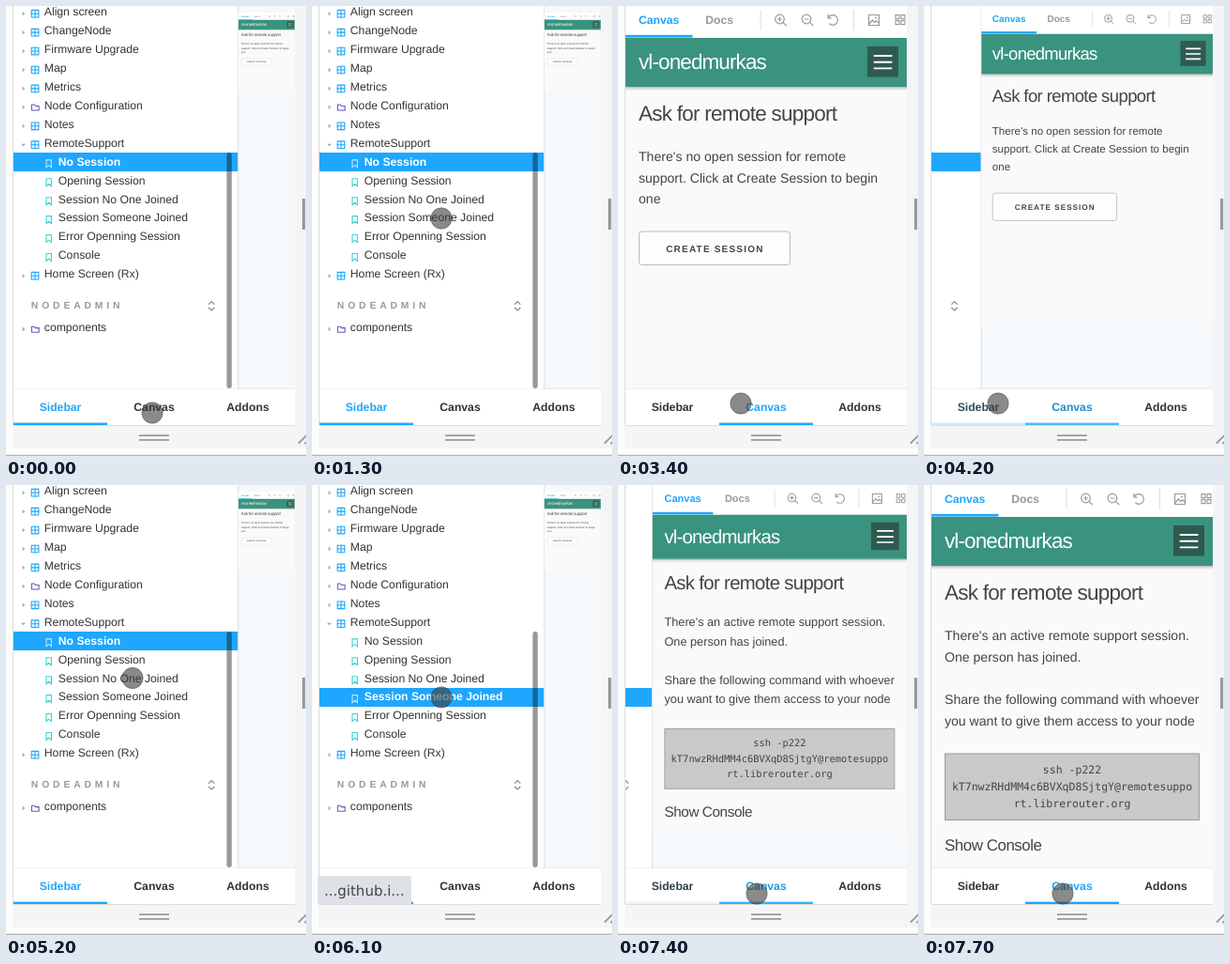
Recreate the animation shown at these times as an HTML page. Size 320 px wide and 480 px high, loop 8000 ms.

```html
<!DOCTYPE html>
<html lang="en">
<head>
<meta charset="utf-8">
<title>Remote support stories</title>
<style>
  html, body { margin: 0; width: 100%; height: 100%; overflow: hidden; background: #fff; }
  svg { display: block; width: 100vw; height: 100vh; }
  text { font-family: "Liberation Sans", Arial, sans-serif; text-rendering: geometricPrecision; white-space: pre; }
  .b { font-weight: 700; }
  .mono { font-family: "DejaVu Sans Mono", monospace; }
  .tip { font-family: "DejaVu Sans", sans-serif; }
</style>
</head>
<body>
<svg id="stage" viewBox="0 0 320 480" xmlns="http://www.w3.org/2000/svg"></svg>
<script>
const LOOP = 8000, STEP = 100;
const BLUE = '#1ea7fd', DARK = '#333', GREY = '#999';

const rect = (x, y, w, h, fill, more = '') =>
  `<rect x="${x}" y="${y}" width="${w}" height="${h}" fill="${fill}" ${more}/>`;
const line = (d, stroke, width = 1, more = '') =>
  `<path d="${d}" fill="none" stroke="${stroke}" stroke-width="${width}" ${more}/>`;
const label = (x, y, str, size, fill, more = '') =>
  `<text x="${x}" y="${y}" font-size="${size}" fill="${fill}" ${more}>${str}</text>`;
const bold = 'class="b"';

// Sidebar tree
const icons = {
  part: y => line(`M27.2 ${y - 3.8}h7.6v7.6h-7.6zM31 ${y - 4.5}v9M26.4 ${y}h9.2`, BLUE, 1.1),
  folder: y => line(`M27.4 ${y + 3.2}v-6h3l1 1.4h3.7v4.6z`, '#6f54b8', 1.1),
  story: y => line(`M43 ${y - 3.8}h5.4v8l-2.7-2.4l-2.7 2.4z`, '#37d5d3', 1.1)
};
const tree = [
  ['part', 'Align screen'], ['part', 'ChangeNode'], ['part', 'Firmware Upgrade'], ['part', 'Map'],
  ['part', 'Metrics'], ['folder', 'Node Configuration'], ['part', 'Notes'], ['part', 'RemoteSupport'],
  ['story', 'No Session'], ['story', 'Opening Session'], ['story', 'Session No One Joined'],
  ['story', 'Session Someone Joined'], ['story', 'Error Openning Session'], ['story', 'Console'],
  ['part', 'Home Screen (Rx)']
];
const caret = (y, open) =>
  `<path d="${open ? `M16 ${y - 1}h5l-2.5 2.6z` : `M17.6 ${y - 2.4}v4.8l2.6-2.4z`}" fill="#aaa"/>`;

function row(kind, name, y, open) {
  const story = kind === 'story';
  return (story ? '' : caret(y - 2, open)) + icons[kind](y - 2) +
    label(story ? 55.8 : 40.8, y, name, 12.2, DARK);
}
const rowY = i => 10.2 + 19.93 * i;
const pick = i => `<g id="pick${i}">${rect(8, 136 + 20 * (i - 7), 239.5, 20, BLUE)}` +
  line(`M43 ${rowY(i) - 5.8}h5.4v8l-2.7-2.4l-2.7 2.4z`, '#b9e6ff', 1.1) +
  label(55.8, rowY(i), tree[i][1], 12.2, '#fff', bold) + '</g>';

const sidebar = rect(8, 0, 240, 408, '#fff') +
  tree.map(([kind, name], i) => row(kind, name, rowY(i), i === 7)).join('') +
  pick(8) + pick(11) +
  label(26.8, 322.3, 'NODEADMIN', 10.3, GREY, 'class="b" letter-spacing="3.9"') +
  line('M216 317.6l3.2-3l3.2 3M216 321l3.2 3l3.2-3', '#888', 1.2) +
  row('folder', 'components', 346, false) +
  rect(235.4, 156, 5.4, 251, '#000', 'rx="2.4" opacity=".4" id="thumb"');

// Canvas pane
const lens = (x, sign) =>
  `<circle cx="${x}" cy="14" r="4.8" fill="none" stroke="${GREY}" stroke-width="1.2"/>` +
  line(`M${x + 3.4} 17.4l3.8 3.6M${x - 2.4} 14h4.8${sign ? `M${x} 11.6v4.8` : ''}`, GREY, 1.2);
const cell = (x, y) => line(`M${x} ${y}h4v4h-4z`, GREY, 1.1);

const toolbar = rect(8, -5, 300, 38.5, '#fff') +
  label(22, 19, 'Canvas', 12.2, BLUE, bold) + label(93.3, 19, 'Docs', 12.2, GREY, bold) +
  rect(8, 30.8, 71.5, 2.8, BLUE) +
  rect(151.6, 4, 1, 22, '#ddd') + rect(251, 4, 1, 22, '#ddd') +
  lens(172.5, true) + lens(201, false) +
  line('M224 9v4h4M224.4 12.6a5.3 5.3 0 1 1 1 6.2', GREY, 1.2) +
  line('M267.5 9.5h11v11h-11zM268 19l3.4-4l2.4 2.4l2-1.6l2.6 2.4', GREY, 1.2) +
  `<circle cx="275" cy="12.6" r="1" fill="${GREY}"/>` +
  cell(296, 9.6) + cell(302, 9.6) + cell(296, 15.6) + cell(302, 15.6);

const header = rect(8, 86, 300, 1.5, '#000', 'opacity=".22"') +
  rect(8, 87.5, 300, 2, '#000', 'opacity=".08"') +
  rect(8, 34, 300, 52, '#39937f') +
  label(22, 67, 'vl-onedmurkas', 22.5, '#fff', 'letter-spacing="-.9"') +
  rect(266, 43, 33, 32.5, '#2f5a50') +
  line('M272.8 53h19.6M272.8 59.8h19.6M272.8 66.4h19.6', '#fff', 1.9);

const lines = list => list.map(([y, str]) => label(22, y, str, 14.08, '#444')).join('');
const command = ['ssh -p222', 'kT7nwzRHdMM4c6BVXqD8SjtgY@remotesuppo', 'rt.librerouter.org'];

const idle = lines([
  [165, "There's no open session for remote"],
  [187.6, 'support. Click at Create Session to begin'],
  [210.2, 'one']
]) + rect(22.5, 240, 161, 35.5, '#fdfdfd', 'rx="3" stroke="#bbb"') +
  label(51.2, 262, 'CREATE SESSION', 10, '#444', 'class="b" letter-spacing="1.2"');

const joined = lines([
  [165, "There's an active remote support session."],
  [187.6, 'One person has joined.'],
  [233.2, 'Share the following command with whoever'],
  [255.8, 'you want to give them access to your node']
]) + rect(22.5, 286, 271, 70.5, '#c9c9c9', 'stroke="#999"') +
  command.map((str, i) => label(158, 307 + 18 * i, str, 11.5, '#444', 'class="mono" text-anchor="middle"')).join('') +
  label(22, 389, 'Show Console', 16.9, '#444', 'letter-spacing="-.45"');

const canvas = rect(8, 33, 300, 378, '#fafafa') + toolbar + header +
  label(22, 122, 'Ask for remote support', 22.5, '#444', 'letter-spacing="-.74"') +
  `<g id="idle">${idle}</g><g id="joined">${joined}</g>`;

// Bottom navigation and window frame
const tabs = ['Sidebar', 'Canvas', 'Addons'];
const nav = rect(8, 406.5, 300, 1.5, '#000', 'opacity=".04"') + rect(8, 408, 300, 38, '#fff') +
  tabs.map((name, i) =>
    label(58 + 100 * i, 431, name, 12.2, DARK, `id="tab${i}" class="b" text-anchor="middle"`) +
    rect(8 + 100 * i, 443.6, 100, 2.6, BLUE, `id="bar${i}" opacity="0"`)).join('');

const frame = rect(0, 0, 320, 480, '#fdfdfd') + rect(7, 0, 313, 471, '#f5f5f5') +
  rect(7, 0, 1, 446, '#dcdcdc') + rect(0, 477.6, 320, 1.6, '#b5b5b5') +
  line('M142 457.2h32M142 461.8h32', '#999', 1.8) +
  line('M312 465.5l9-9M318.5 466l3-3', '#999', 1.8) +
  rect(316, 205, 3.2, 33, '#999');

const bubble = `<g id="bubble"><path d="M6 446.5v-30.5h96a4 4 0 0 1 4 4v26.5z" fill="#dee1e6"/>` +
  label(13, 437, '...github.i...', 15, '#444', 'class="tip"') + '</g>';

const stage = document.getElementById('stage');
stage.innerHTML = `<clipPath id="view"><rect x="8" width="300" height="446"/></clipPath>
  ${frame}
  <g clip-path="url(#view)">
    <g id="sidebar">${sidebar}</g>
    <g id="back">${rect(248, 0, 300, 408, '#f6f9fc')}${rect(247.3, 0, 1, 408, '#dedede')}</g>
    <g id="canvas">${canvas}</g>
    ${nav}
  </g>
  ${rect(8, 446, 300, 1, '#ddd')}
  ${bubble}
  <circle id="cursor" r="11.2" fill="#3c3c3c" fill-opacity=".6" stroke="#333" stroke-opacity=".4"/>`;

const el = {};
stage.querySelectorAll('[id]').forEach(node => { el[node.id] = node; });
const set = (id, name, value) => el[id].setAttribute(name, value);
const show = (id, on) => set(id, 'display', on ? 'inline' : 'none');

// Keys: time, then values
const path = [
  [0, 156, 433], [100, 158, 423], [200, 154, 370], [300, 147, 285], [400, 139, 216], [500, 136, 197],
  [600, 136, 197], [800, 142, 200], [1000, 145, 211], [1200, 140, 223], [1300, 138, 226],
  [1600, 138, 226], [1700, 137, 240], [1900, 139, 335], [2100, 145, 414], [2200, 147, 424],
  [3300, 147, 424], [3400, 131, 423], [3600, 97, 423], [3800, 78, 423],
  [3900, 78, 423], [4000, 79, 423], [4400, 79, 423], [4600, 92, 360], [4800, 113, 262], [5000, 127, 214],
  [5100, 131, 207], [5200, 135, 205.5], [5400, 140, 216], [5600, 138, 226],
  [6100, 138, 226], [6300, 140, 288], [6500, 146, 402], [6700, 148, 441], [7000, 148, 435]
];
// 1 = sidebar open, 0 = canvas full size
const slide = [
  [2700, 1], [2800, 0], [4100, 0], [4200, .222], [4300, .93], [4400, 1],
  [7200, 1], [7300, .75], [7400, .12], [7500, 0]
];

function at(keys, t) {
  const i = keys.findIndex(k => k[0] > t);
  if (i < 0) return keys[keys.length - 1].slice(1);
  if (i === 0) return keys[0].slice(1);
  const a = keys[i - 1], b = keys[i], f = (t - a[0]) / (b[0] - a[0]);
  return a.slice(1).map((v, n) => v + (b[n + 1] - v) * f);
}
const tint = f => `rgb(${[[51, 30], [51, 167], [51, 253]].map(([a, b]) => Math.round(a + (b - a) * f))})`;

function draw(t) {
  const [x, y] = at(path, t), [p] = at(slide, t), scale = 1 - .8 * p;
  const shift = 240 * (p - 1);
  set('cursor', 'cx', x);
  set('cursor', 'cy', y);
  set('sidebar', 'transform', `translate(${shift})`);
  set('back', 'transform', `translate(${shift})`);
  set('canvas', 'transform', `translate(${308 * (1 - scale)} ${10 * (1 - scale)}) scale(${scale})`);
  [p, 1 - p].forEach((f, i) => {
    set('tab' + i, 'fill', tint(f));
    set('bar' + i, 'opacity', f);
  });
  show('thumb', p === 1);
  show('pick8', t < 6000);
  show('pick11', t >= 6000);
  show('idle', t < 6300);
  show('joined', t >= 6300);
  show('bubble', t >= 5900 && t < 7400);
}

const start = performance.now();
function tick() {
  const t = (performance.now() - start) % LOOP;
  draw(Math.floor(t / STEP) * STEP);
  requestAnimationFrame(tick);
}
draw(0);
requestAnimationFrame(tick);
</script>
</body>
</html>
```
